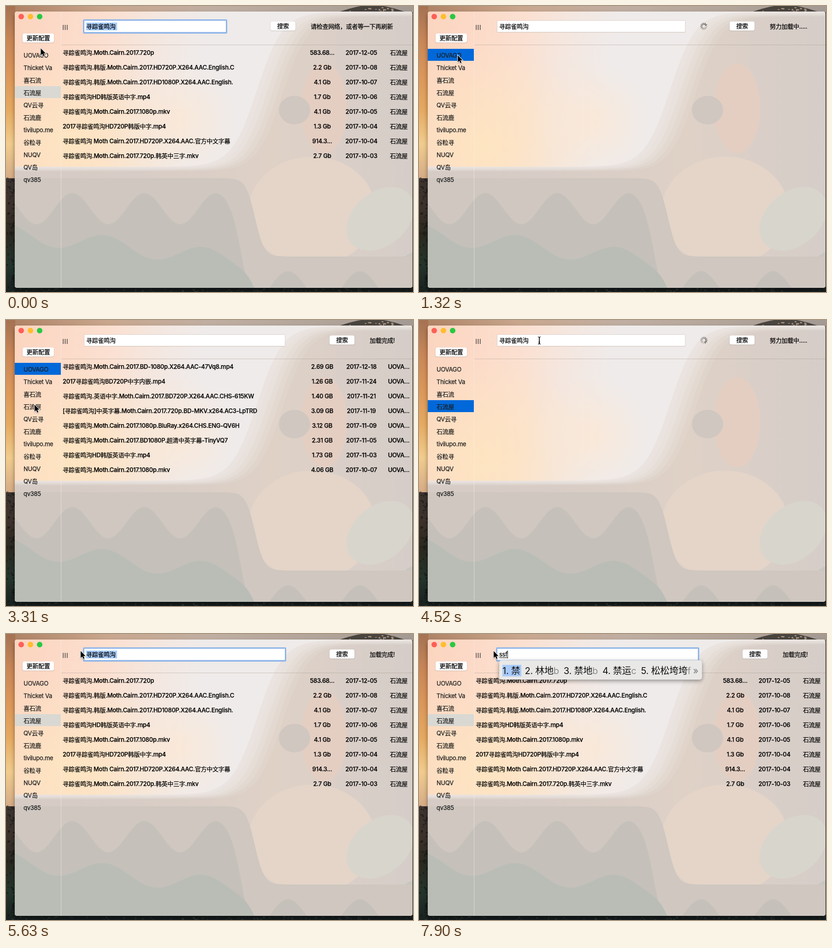
Write an HTML page with a canvas that moves like this. It is 883 px wide and 621 px high and loops after 8000 ms.

```html
<!DOCTYPE html>
<html lang="zh">
<head>
<meta charset="utf-8">
<title>Search window</title>
<style>
html, body { margin: 0; width: 100%; height: 100%; overflow: hidden; background: #1a1f1f; }
canvas { display: block; width: 883px; height: 621px; }
</style>
</head>
<body>
<canvas id="stage" width="883" height="621"></canvas>
<script>
const W = 883, H = 621, LOOP = 8000, TICK = 116;
const FAMILY = 'Inter, "Noto Sans CJK SC", "Noto Sans CJK", sans-serif';
const stage = document.getElementById('stage').getContext('2d');
let g = stage;

const TITLE = '寻踪雀鸣沟', EN = 'Moth.Cairn';
const SITES = ['UOVAGO', 'Thicket Va', '喜石流', '石流屋', 'QV云寻', '石流鹿',
  'tivilupo.me', '谷粒寻', 'NUQV', 'QV岛', 'qv385'];

const LIST_A = {
  source: '石流屋',
  rows: [
    [`${TITLE}.${EN}.2017.720p`, '583.68...', '2017-12-05'],
    [`${TITLE}.韩版.${EN}.2017.HD720P.X264.AAC.English.C`, '2.2 Gb', '2017-10-08'],
    [`${TITLE}.韩版.${EN}.2017.HD1080P.X264.AAC.English.`, '4.1 Gb', '2017-10-07'],
    [`${TITLE}HD韩版英语中字.mp4`, '1.7 Gb', '2017-10-06'],
    [`${TITLE}.${EN}.2017.1080p.mkv`, '4.1 Gb', '2017-10-05'],
    [`2017${TITLE}HD720P韩版中字.mp4`, '1.3 Gb', '2017-10-04'],
    [`${TITLE} ${EN.replace('.', ' ')}.2017.HD720P.X264.AAC.官方中文字幕`, '914.3...', '2017-10-04'],
    [`${TITLE}.${EN}.2017.720p.韩英中三字.mkv`, '2.7 Gb', '2017-10-03']
  ]
};
const LIST_B = {
  source: 'UOVA...',
  rows: [
    [`${TITLE}.${EN}.2017.BD-1080p.X264.AAC-47Vq8.mp4`, '2.69 GB', '2017-12-18'],
    [`2017${TITLE}BD720P中字内嵌.mp4`, '1.26 GB', '2017-11-24'],
    [`${TITLE}.英语中字.${EN}.2017.BD720P.X264.AAC.CHS-615KW`, '1.40 GB', '2017-11-21'],
    [`[${TITLE}]中英字幕.${EN}.2017.720p.BD-MKV.x264.AC3-LpTRD`, '3.09 GB', '2017-11-19'],
    [`${TITLE}.${EN}.2017.1080p.BluRay.x264.CHS.ENG-QV6H`, '3.12 GB', '2017-11-09'],
    [`${TITLE}.${EN}.2017.BD1080P.超清中英字幕-TinyVQ7`, '2.31 GB', '2017-11-05'],
    [`${TITLE}HD韩版英语中字.mp4`, '1.73 GB', '2017-11-03'],
    [`${TITLE}.${EN}.2017.1080p.mkv`, '4.06 GB', '2017-10-07']
  ]
};

// The toolbar is laid out leftwards from the message.
const WARN = { note: '请检查网络，或者等一下再刷新', x: 661 };
const BUSY = { note: '努力加载中.....', x: 761 };
const DONE = { note: '加载完成!', x: 789 };

const SCENES = [
  { at: 0, bar: WARN, list: LIST_A, row: 3, focusAt: -LOOP },
  { at: 740, bar: WARN, list: LIST_A, row: 0 },
  { at: 850, bar: BUSY, row: 0 },
  { at: 2010, bar: DONE, list: LIST_B, row: 0 },
  { at: 3670, bar: DONE, list: LIST_B, row: 3 },
  { at: 3790, bar: BUSY, row: 3 },
  { at: 4640, bar: DONE, list: LIST_A, row: 3 },
  { at: 5120, bar: DONE, list: LIST_A, row: 3, focusAt: 5120 }
];
const TYPED = [
  { at: 6950, text: 's' }, { at: 7180, text: 'ss' }, { at: 7780, text: 'ssf' }
];
const POPUPS = [
  { at: 6950, words: ['要', '想要sv', '可能ce', '相辅相成ld', '横冲直撞fu'] },
  { at: 7180, words: ['林', '森林s', '村村c', '楚楚n', '林林总总u'] },
  { at: 7900, words: ['禁', '林地b', '禁地b', '禁运c', '松松垮垮f'] }
];
const MOVES = [
  { at: 120, end: 380, x: 84, y: 107 },
  { at: 2250, end: 2720, x: 66, y: 176 },
  { at: 2960, end: 3310, x: 62, y: 184 },
  { at: 3790, end: 4520, x: 261, y: 44 },
  { at: 5120, end: 5630, x: 162, y: 37 }
];

const latest = (items, t) => items.filter(i => i.at <= t).pop();
const ease = p => p * p * (3 - 2 * p);
const logistic = v => 1 / (1 + Math.exp(-v));

// Eased moves, held between screen updates.
function pointerAt(t) {
  let x = 75.5, y = 92;
  for (const m of MOVES) {
    if (t < m.at) break;
    const steps = Math.round((m.end - m.at) / TICK) + 1;
    const done = t >= m.end ? steps : Math.floor((t - m.at) / TICK) + 1;
    const p = ease(Math.min(1, done / steps));
    x += (m.x - x) * p;
    y += (m.y - y) * p;
  }
  return { x, y };
}

function box(x, y, w, h, r, fill) {
  g.beginPath();
  g.roundRect(x, y, w, h, r);
  g.fillStyle = fill;
  g.fill();
}

function rect(x, y, w, h, fill) {
  g.fillStyle = fill;
  g.fillRect(x, y, w, h);
}

function shadowed(blur, dy, alpha, paint) {
  g.save();
  g.shadowColor = `rgba(0,0,0,${alpha})`;
  g.shadowBlur = blur;
  g.shadowOffsetY = dy;
  paint();
  g.restore();
}

function text(s, x, y, { size = 13, bold = false, align = 'left', color = '#000' } = {}) {
  g.font = `${bold ? 500 : 400} ${size}px ${FAMILY}`;
  g.letterSpacing = '-0.25px';
  g.textAlign = align;
  g.textBaseline = 'alphabetic';
  g.fillStyle = g.strokeStyle = color;
  g.fillText(s, x, y + size * 0.36);
  g.lineWidth = 0.25;
  if (size < 16) g.strokeText(s, x, y + size * 0.36);
}

function fade(x0, y0, x1, y1, ...colors) {
  const f = g.createLinearGradient(x0, y0, x1, y1);
  colors.forEach((c, i) => f.addColorStop(i / (colors.length - 1), c));
  return f;
}

// Fills everything above (edge = 0) or below (edge = H) the curve y = fn(x).
function field2d(fn, edge, fill) {
  g.beginPath();
  g.moveTo(0, edge);
  for (let x = 0; x <= W; x += 4) g.lineTo(x, fn(x));
  g.lineTo(W, edge);
  g.fillStyle = fill;
  g.fill();
}

function ellipse(x, y, rx, ry, fill, turn = 0) {
  g.beginPath();
  g.ellipse(x, y, rx, ry, turn, 0, Math.PI * 2);
  g.fillStyle = fill;
  g.fill();
}

function glow(x, y, r, rgb, alpha) {
  const f = g.createRadialGradient(x, y, 0, x, y, r);
  f.addColorStop(0, `rgba(${rgb},${alpha})`);
  f.addColorStop(1, `rgba(${rgb},0)`);
  rect(x - r, y - r, r * 2, r * 2, f);
}

function paintDesktop() {
  let seed = 7;
  const rnd = () => (seed = (seed * 16807) % 2147483647) / 2147483647;
  const specks = (n, x, y, w, h, color) => {
    for (let i = 0; i < n; i++) rect(x + rnd() * w, y + rnd() * h, 2 + rnd() * 3, 1 + rnd() * 3, color);
  };
  rect(0, 0, W, H, '#161c1c');
  rect(0, 0, W, 14, fade(0, 0, W, 0, '#ad8062', '#c9a78e', '#c0aea2', '#b3a59a', '#a39a93'));
  field2d(x => 13 - 15 * Math.sin(Math.PI * Math.max(0, Math.min(1, (x - 722) / 145))), 14, '#4a443f');
  specks(18, 745, 2, 100, 9, '#a79482');
  rect(0, 0, 20, 374, fade(0, 0, 0, 374, '#a47253', '#c98656', '#dc9659', '#e5a960', '#f1cc8d', '#d5ab86'));
  rect(0, 374, 20, H, fade(0, 374, 0, H, '#3c3430', '#3d322b', '#29291f', '#25352c', '#18211f'));
  specks(80, 0, 372, 18, 245, 'rgba(12,15,15,.5)');
  specks(90, 0, 612, W, 8, 'rgba(70,84,76,.35)');
}

function paintGlass() {
  rect(19, 12, 863, 600, fade(119, 0, W, 0, '#d6ccc5', '#d8cdc6', '#dacec6', '#dfd1c6', '#dacfc8', '#d5cdc8'));

  // right: warm patches over grey
  ellipse(690, 222, 50, 98, '#e4cec2');
  ellipse(626, 226, 34, 31, '#d1c7c1');
  ellipse(664, 445, 138, 118, '#e4d5c8');
  ellipse(812, 462, 82, 58, '#d8d5cd', -0.7);
  ellipse(720, 622, 75, 48, '#cbc6bf');
  ellipse(905, 610, 70, 80, '#c8c6bf');

  // lower left: rolling hills
  const fall = x => 170 * logistic((x - 512) / 10);
  field2d(x => 374 + fall(x - 28), H, '#cfc7c0');
  field2d(x => 440 - 34 * Math.cos((x - 300) * Math.PI / 78) + fall(x), H, '#c5c0ba');
  field2d(x => 492 + 0.12 * x - 20 * Math.cos((x - 215) * Math.PI / 107) + fall(x - 30) / 2, H, '#b9bdb6');

  // sky: its edge steps from ground tone to pale
  const sky = x => 349 - 336 * logistic((x - 545) / 28);
  for (let i = 5; i >= 1; i--)
    field2d(x => sky(x - i * 11) + i * 2, 0, `rgba(236,230,227,${0.5 - i * 0.07})`);
  g.save();
  field2d(sky, 0, fade(19, 60, 520, 130, '#fbd5bf', '#fcdac8', '#fbe0d1', '#f4e7e0', '#efebea', '#efebea'));
  g.clip();
  glow(140, 300, 230, '254,229,192', 0.95);
  glow(370, 250, 130, '251,232,214', 0.9);
  g.restore();
}

function button(x, w, y, label) {
  shadowed(1.5, 0.5, 0.3, () => box(x, y, w, 20, 4, '#fff'));
  text(label, x + w / 2, y + 10, { align: 'center' });
}

function paintBackdrop() {
  paintDesktop();
  shadowed(10, 5, 0.4, () => box(19, 12, 863, 600, 5, '#d9cec7'));
  g.save();
  g.beginPath();
  g.roundRect(19, 12, 863, 600, 5);
  g.clip();
  paintGlass();
  rect(119, 12, 1, 600, 'rgba(245,238,232,.6)');
  rect(120, 84, 762, 1, 'rgba(160,148,140,.45)');
  g.restore();
  ['#ff5f57', '#ffbd2e', '#28c941'].forEach((c, i) => box(27 + i * 20, 17, 12, 12, 6, c));
  for (let i = 0; i < 3; i++) rect(123.5 + i * 4.3, 41, 1.2, 11, '#222');
  button(36, 68, 59.5, '更新配置');
}

function spinner(x, y, t) {
  const turn = Math.floor(t / TICK);
  g.lineCap = 'round';
  g.lineWidth = 1.5;
  for (let i = 0; i < 12; i++) {
    const a = i * Math.PI / 6, age = ((turn - i) % 12 + 12) % 12;
    const c = Math.cos(a), s = Math.sin(a);
    g.strokeStyle = `rgba(40,36,34,${0.85 - age * 0.055})`;
    g.beginPath();
    g.moveTo(x + c * 4, y + s * 4);
    g.lineTo(x + c * 7.3, y + s * 7.3);
    g.stroke();
  }
  g.lineCap = 'butt';
}

function searchField(scene, t, pointer) {
  const w = scene.bar.x - 184 - 170, focused = 'focusAt' in scene;
  if (focused) {
    // the ring shrinks onto the field
    const step = Math.min(4, Math.floor((t - scene.focusAt) / TICK));
    const rest = (1 - step / 4) ** 2, grow = 3 + 15 * rest;
    g.globalAlpha = 1 - 0.85 * rest;
    box(170 - grow, 32 - grow, w + grow * 2, 25 + grow * 2, grow, '#8fb5e8');
    g.globalAlpha = 1;
  } else {
    rect(169.5, 31.5, w + 1, 26, '#c9bcb2');
  }
  rect(170, 32, w, 24.5, '#fff');
  const typed = latest(TYPED, t);
  if (typed) {
    text(typed.text, 174, 44);
    const end = 174 + g.measureText(typed.text).width;
    rect(174, 51, end - 174, 1, '#000');
    rect(end, 36, 1, 17, '#000');
    return;
  }
  if (focused) {
    const from = scene.focusAt < 0 ? 174 : Math.max(174, Math.min(241, pointer.x));
    rect(from, 36, 241 - from, 17, '#a8cdfc');
  }
  text(TITLE, 174, 44);
}

function sidebar(scene) {
  rect(19, 93 + scene.row * 27, 100, 26, 'focusAt' in scene ? '#d9d8d3' : '#0068d9');
  SITES.forEach((name, i) => text(name, 38, 107 + i * 27, { color: '#1d1d1d' }));
}

function results(list) {
  list.rows.forEach(([name, size, date], i) => {
    const y = 101 + i * 32, mid = { bold: true, align: 'center' };
    text(name, 123, y, { bold: true });
    text(size, 686, y, mid);
    text(date, 771, y, mid);
    text(list.source, 852, y, mid);
  });
}

function popup(words) {
  const parts = [];
  let x = 181;
  g.font = `400 20px ${FAMILY}`;
  g.letterSpacing = '-0.25px';
  const add = (s, color) => {
    parts.push([s, x, color]);
    x += g.measureText(s).width;
  };
  words.forEach((word, i) => {
    const [, main, hint] = word.match(/^([^a-z]+)([a-z]*)$/);
    add(`${i + 1}. ${main}`, '#111');
    add(hint, '#8b8b8b');
    x += i < words.length - 1 ? 10 : 5;
  });
  add('»', '#777');
  shadowed(10, 3, 0.4, () => box(174, 57, x + 8 - 174, 42, 5, '#e9e8e7'));
  rect(181, 67, 41, 25, '#a9cbfa');
  parts.forEach(([s, px, color]) => text(s, px, 80, { size: 20, color }));
}

function arrow(x, y) {
  const shape = new Path2D('M0 0V15L3.4 11.8 5.8 17 8.2 16 5.9 10.8H10.5Z');
  g.save();
  g.translate(x, y);
  g.lineWidth = 2;
  g.strokeStyle = '#fff';
  shadowed(2, 1, 0.35, () => g.stroke(shape));
  g.fillStyle = '#000';
  g.fill(shape);
  g.restore();
}

function beam(x, y) {
  const half = new Path2D('M-3 -8Q0 -8 0 -5V5Q0 8 -3 8M0 3.5H-2');
  g.strokeStyle = '#000';
  g.lineWidth = 1.2;
  for (const side of [1, -1]) {
    g.save();
    g.translate(x, y + 0.5);
    g.scale(side, 1);
    g.stroke(half);
    g.restore();
  }
}

const backdrop = document.createElement('canvas');
backdrop.width = W;
backdrop.height = H;
g = backdrop.getContext('2d');
paintBackdrop();
g = stage;

function draw(t) {
  const scene = latest(SCENES, t), { bar } = scene, pointer = pointerAt(t);
  g.drawImage(backdrop, 0, 0);
  sidebar(scene);
  searchField(scene, t, pointer);
  if (bar === BUSY) spinner(618, 44, t);
  button(bar.x - 87, 54, 33.5, '搜索');
  text(bar.note, bar.x, 44);
  if (scene.list) results(scene.list);
  const choices = latest(POPUPS, t);
  if (choices) popup(choices.words);
  const inField = pointer.x > 170 && pointer.y > 32 && pointer.y < 57;
  (inField ? beam : arrow)(pointer.x, pointer.y);
}

const begin = performance.now();
function tick() {
  draw((performance.now() - begin) % LOOP);
  requestAnimationFrame(tick);
}
tick();
</script>
</body>
</html>
```
